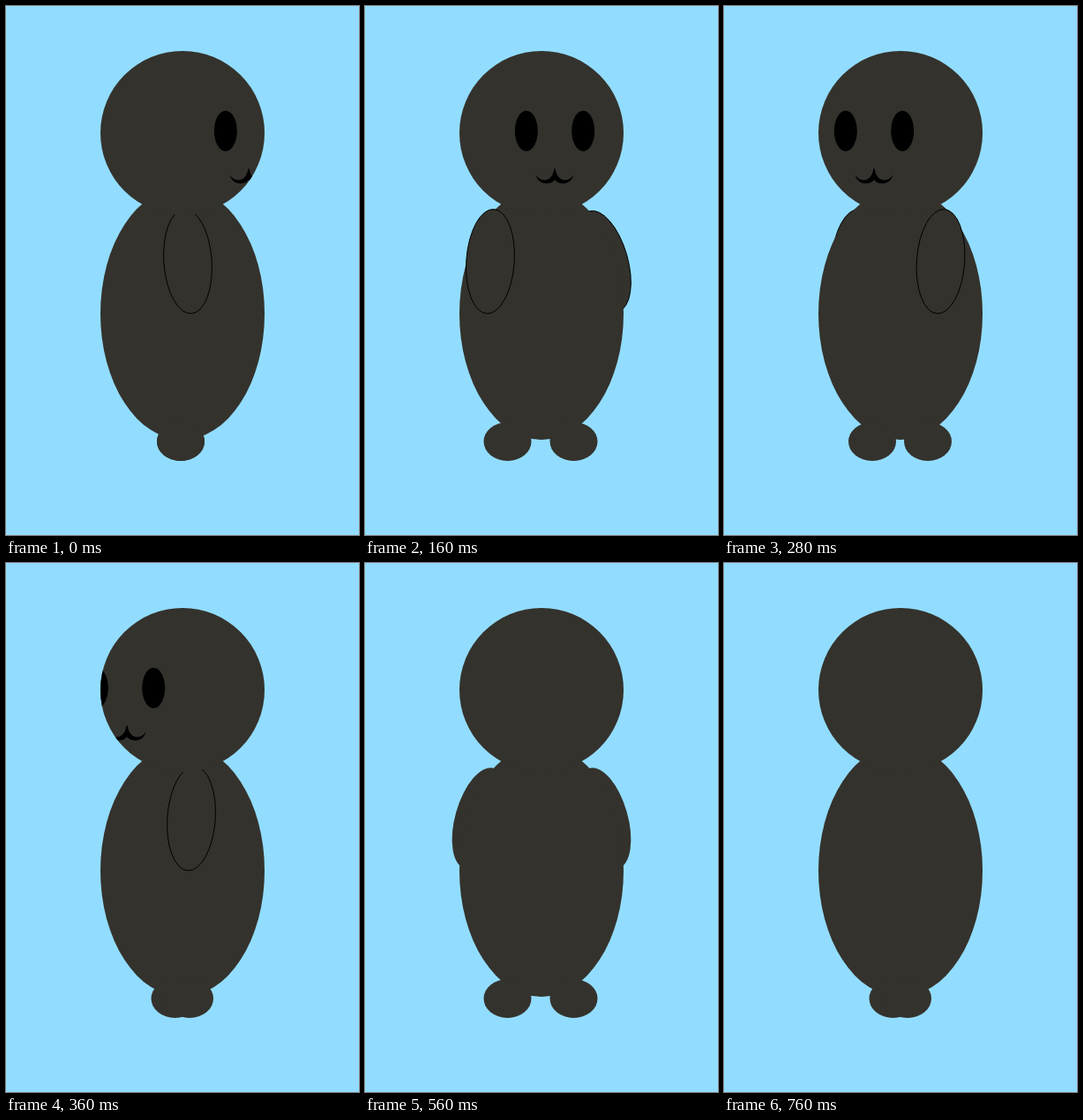
These frames come from a looping animation (400x600 px, 800 ms). An HTML page with a canvas:

```html
<!DOCTYPE html>
<html>
<head>
<meta charset="utf-8">
<style>
  html, body { margin: 0; height: 100%; overflow: hidden; background: #92ddff; }
  canvas { display: block; }
</style>
</head>
<body>
<canvas id="stage" width="400" height="600"></canvas>
<script>
const ctx = document.getElementById('stage').getContext('2d');
const FUR = '#34322d';
const STEP = 40, STEPS = 20;

// Poses from profile (0) to facing straight on (5); x values are relative to the body axis.
const POSES = [
  { feet: [-2, -2],      face: 81, mouth: 75, near: [6, -4] },
  { feet: [-8.5, 8],     face: 65, mouth: 63, near: [-10, -4] },
  { feet: [-14.5, 25],   face: 49, mouth: 49, near: [-26.5, -4] },
  { feet: [-32, 31],     face: 30, mouth: 30, near: [-45.5, -4], far: [51, -4] },
  { feet: [-38.5, 36.5], face: 15, mouth: 15, near: [-58, 4],    far: [70.5, -16] },
  { feet: [-45, 45],     face: 0,  mouth: 0,  near: [-71, 12.5], far: [71, -12.5] }
];

const mouthShape = new Path2D(
  'M-21.5 191C-17 200 -3 201 -.6 184.5L.6 184.5C3 201 17 200 21.5 191' +
  'C19 203.5 4 203.5 0 197C-4 203.5 -19 203.5 -21.5 191Z');

function ellipse(x, y, rx, ry, color = FUR, tilt = 0) {
  ctx.beginPath();
  ctx.ellipse(x, y, rx, ry, tilt * Math.PI / 180, 0, 2 * Math.PI);
  ctx.fillStyle = color;
  ctx.fill();
}

function arm([x, tilt], side, outlined) {
  ellipse(x * side, 289.7, 27.2, 59.3, FUR, tilt * side);
  if (outlined) ctx.stroke();
}

function drawFace(pose, side) {
  ctx.save();
  ctx.clip(); // the head is the current path
  ctx.scale(side, 1);
  for (const eye of [-32.2, 32.2]) ellipse(pose.face + eye, 141.7, 13, 23, '#000');
  ctx.translate(pose.mouth, 0);
  ctx.fill(mouthShape);
  ctx.restore();
}

function draw(step) {
  const turn = step % 10;
  const k = turn > 5 ? 10 - turn : turn;
  const pose = POSES[k];
  const front = step <= 10;
  const side = front && step > 5 ? -1 : 1;

  ctx.setTransform(1, 0, 0, 1, 0, 0);
  ctx.fillStyle = '#92ddff';
  ctx.fillRect(0, 0, 400, 600);
  ctx.translate(200, 0);

  if (pose.far) {
    arm(pose.far, side, front);
    if (!front) arm(pose.far, -1, false);
  }
  ellipse(0, 349, 93, 143);
  for (const x of pose.feet) ellipse(x, k === 5 ? 489.3 : 494, 27, 22);
  if (front) {
    arm(pose.near, side, true);
    if (k === 5) arm(pose.far, side, true);
  }
  ellipse(0, 144, 93, 93);
  if (front) drawFace(pose, side);
}

function tick() {
  draw(Math.floor(performance.now() / STEP) % STEPS);
  requestAnimationFrame(tick);
}
tick();
</script>
</body>
</html>
```
